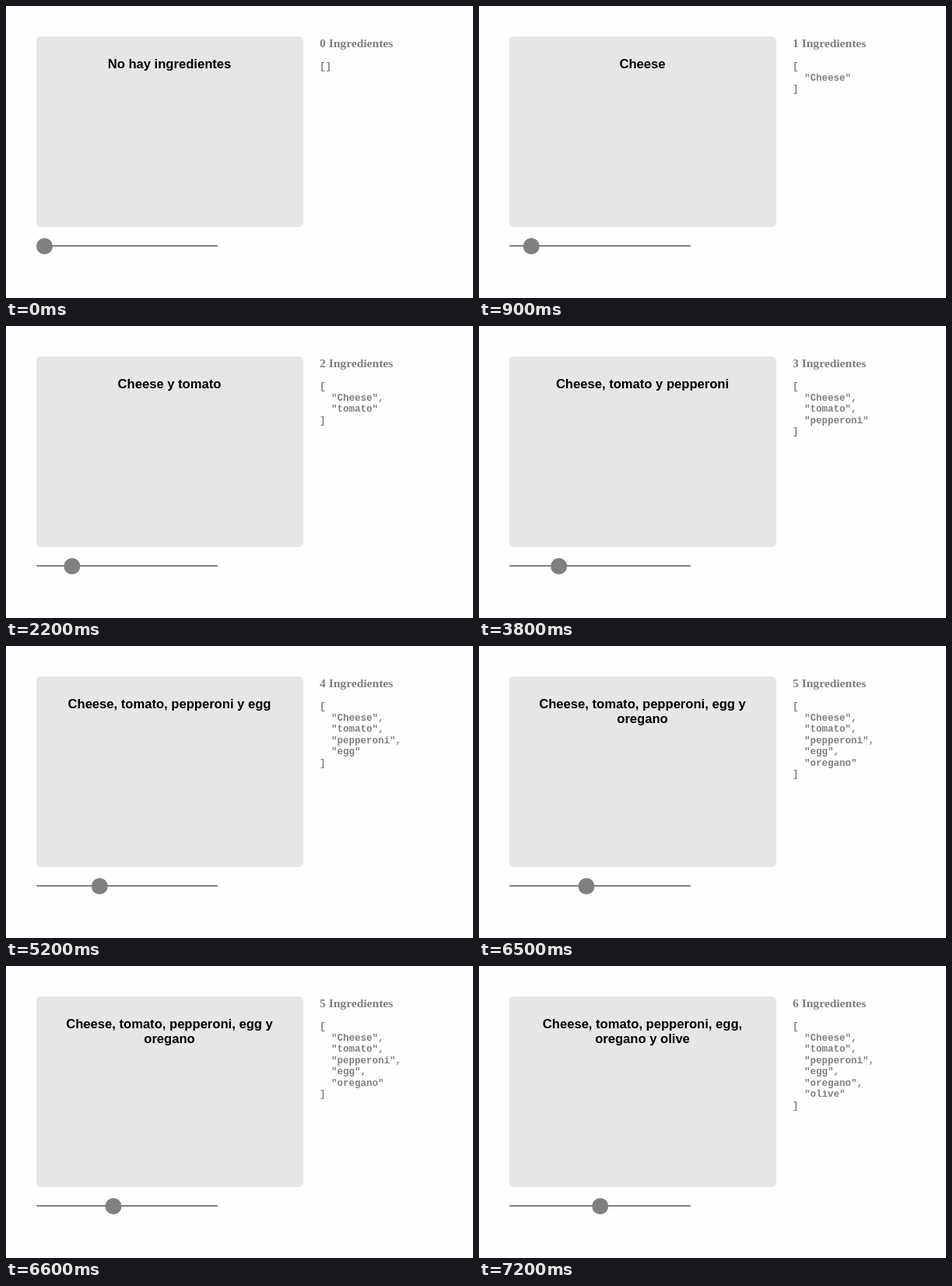
These frames come from a looping animation (600x375 px, 8 s). An HTML page:

```html
<!DOCTYPE html>
<html lang="es">
<head>
<meta charset="utf-8">
<title>Ingredientes</title>
<style>
  html, body { margin: 0; width: 100%; height: 100%; overflow: hidden; background: #fefdff; }
  body > * { position: absolute; margin: 0; box-sizing: border-box; color: #807f81; font-weight: bold; }
  #panel {
    left: 38.5px; top: 39px; width: 343px; height: 245px; padding: 26px 20px;
    border-radius: 6px; background: #e6e5e8; color: #000; text-align: center;
    font: bold 16.6px/19px "Liberation Sans", Arial, sans-serif;
  }
  #count { left: 403px; top: 38.7px; font: bold 15.55px/18px "Liberation Serif", Times, serif; }
  #list { left: 403px; top: 71px; font: bold 12.5px/14.55px "Liberation Mono", Courier, monospace; }
  #track { left: 38.5px; top: 306.8px; width: 233px; height: 2.5px; border-radius: 2px; background: #807f81; }
  #knob { left: 38.5px; top: 297.5px; width: 21px; height: 21px; border-radius: 50%; background: #807f81; }
</style>
</head>
<body>
<div id="panel"></div>
<h3 id="count"></h3>
<pre id="list"></pre>
<div id="track"></div>
<div id="knob"></div>
<script>
  const LOOP = 8000;
  const STEP = 17.7;
  const ingredients = ["Cheese", "tomato", "pepperoni", "egg", "oregano", "olive"];
  const addedAt = [900, 2200, 3800, 5200, 6500, 7200];
  const [panel, count, list, knob] = ["panel", "count", "list", "knob"].map(id => document.getElementById(id));
  let shown = -1;

  function sentence(items) {
    if (!items.length) return "No hay ingredientes";
    if (items.length === 1) return items[0];
    return items.slice(0, -1).join(", ") + " y " + items.at(-1);
  }

  function render(n) {
    const items = ingredients.slice(0, n);
    panel.textContent = sentence(items);
    count.textContent = `${n} Ingredientes`;
    list.textContent = JSON.stringify(items, null, 2);
    knob.style.transform = `translateX(${n * STEP}px)`;
  }

  function tick() {
    const time = performance.now() % LOOP;
    const n = addedAt.filter(t => t <= time).length;
    if (n !== shown) render(shown = n);
    requestAnimationFrame(tick);
  }
  tick();
</script>
</body>
</html>
```
